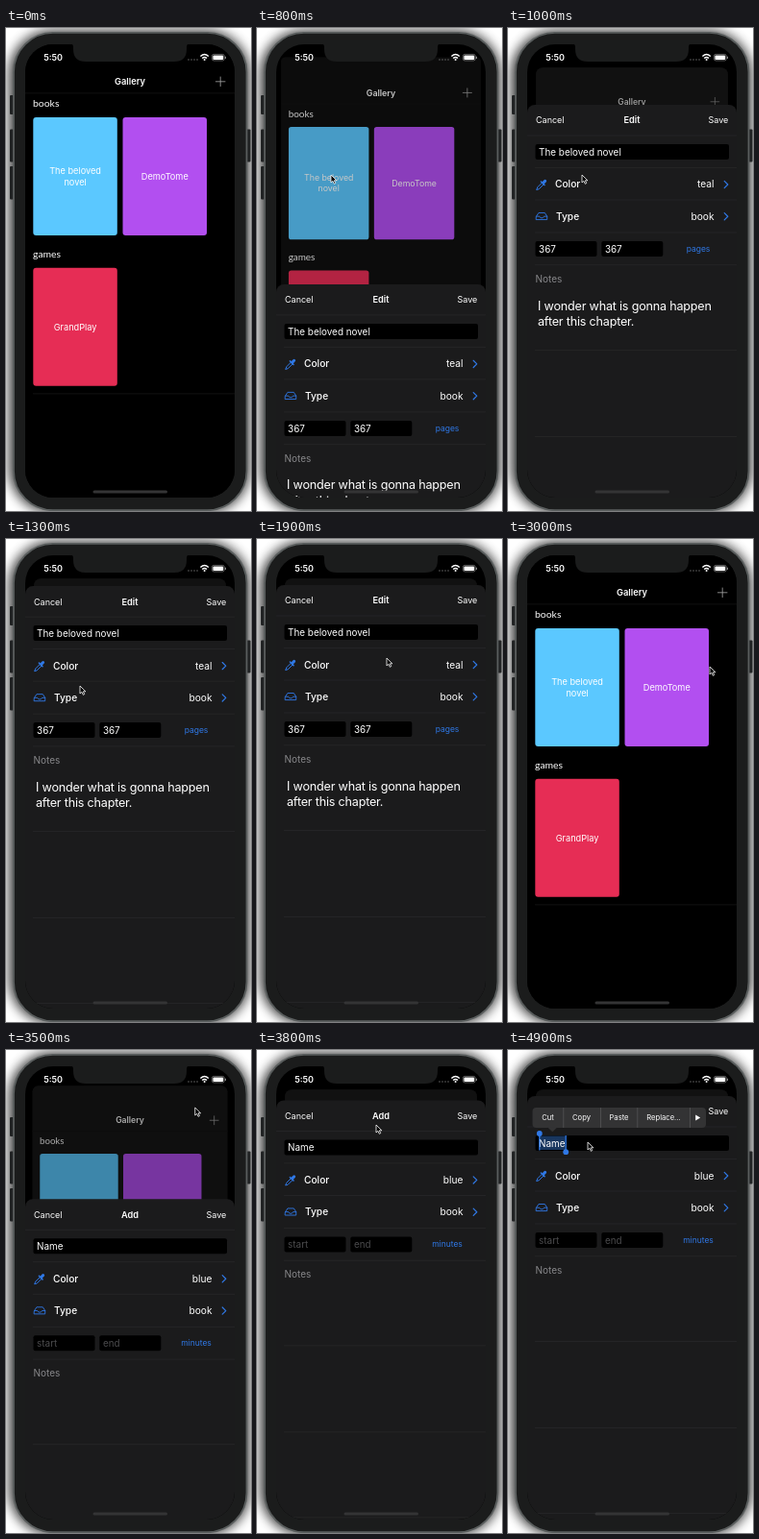
An HTML page that plays this animation: 255 by 503 pixels, repeating every 5000 ms.

```html
<!DOCTYPE html>
<html lang="en">
<head>
<meta charset="utf-8">
<title>Gallery app</title>
<style>
html, body { margin: 0; width: 100%; height: 100%; overflow: hidden; background: #fff; }
svg { display: block; width: 100vw; height: 100vh; }
text { font-family: Inter, "Liberation Sans", sans-serif; fill: #fff; }
.head { font-family: Lato, Inter, sans-serif; }
.icon { fill: none; stroke: #2f78e6; stroke-linecap: round; stroke-linejoin: round; }
</style>
</head>
<body>
<svg id="stage" viewBox="0 0 255 503" preserveAspectRatio="none"></svg>
<script>
const LOOP = 5000, STEP = 100;
const REST = 48, TRAVEL = 441;
const BLUE = '#2f78e6', SHEET = '#1b1b1c';

const rect = (x, y, w, h, fill, r = 0, extra = '') =>
  `<rect x="${x}" y="${y}" width="${w}" height="${h}" rx="${r}" fill="${fill}" ${extra}/>`;

function text(str, x, y, size, o = {}) {
  const { fill = '#fff', weight = 400, anchor = 'start', spacing = 0, cls = '' } = o;
  return `<text x="${x}" y="${y}" font-size="${size}" font-weight="${weight}" text-anchor="${anchor}"
    letter-spacing="${spacing}" class="${cls}" style="fill:${fill}">${str}</text>`;
}

const mid = { anchor: 'middle' };
const rule = (x, y, color = '#272728') => rect(x, y, 238 - x, 0.8, color);

function card(id, x, y, color, lines) {
  const top = y + 65 - (lines.length - 1) * 5.7;
  return `<g id="${id}">${rect(x, y, 87.5, 123, color, 3)}` +
    lines.map((s, i) => text(s, x + 43.8, top + i * 11.2, 9.2, mid)).join('') + '</g>';
}

function gallery() {
  return `<rect id="back" x="20" y="17" width="218" height="472"/>` +
    text('Gallery', 129, 59.2, 9.3, { anchor: 'middle', weight: 600 }) +
    '<path d="M218 55.8h10.4M223.2 50.6v10.4" stroke="#a8a8a8" stroke-width=".8"/>' +
    rule(20, 67.5, '#141414') +
    text('books', 28, 82.3, 10.4, { cls: 'head' }) +
    text('games', 28, 239, 10.4, { cls: 'head' }) +
    rule(28, 380.5, '#161616') +
    card('other', 121.5, 93, '#b24ff0', ['DemoTome']) +
    card('game', 28.3, 249.7, '#e62d55', ['GrandPlay']) +
    card('picked', 28.3, 93, '#5bc8ff', ['The beloved', 'novel']) +
    '<rect id="dim" x="20" y="17" width="218" height="472" fill="#000"/>';
}

const dropper = `<g class="icon"><path d="M29.8 136.2l1-2.4 4.6-4.6 1.7 1.7-4.6 4.6z" stroke-width="1"/>
  <path d="M34.4 128l3.6 3.6" stroke-width="1.5"/><path d="M36.8 129.2l1.8-1.8" stroke-width="3"/></g>`;
const tray = `<path class="icon" stroke-width=".9" d="M29.5 164.2l2.4-3.7h6.4l2.4 3.7v3.4h-11.2zh3.2
  q.6 1.7 2.4 1.7t2.4-1.7h3.2"/>`;

function row(y, icon, label, x, value) {
  return icon + text(label, x, y + 3.5, 10.2, { weight: 500 }) +
    text(value, 214.5, y + 3.5, 10.2, { anchor: 'end' }) +
    `<path class="icon" stroke-width="1.2" d="M225.2 ${y - 3.6}l3.6 3.6-3.6 3.6"/>`;
}

function sheet(id, o) {
  const faint = o.hint ? '#4b4b4d' : '#fff';
  const field = (x, y, w, s, fill) =>
    rect(x, y, w, 16, '#000', 2) + text(s, x + 3.6, y + 11.8, 9.9, { fill });
  return `<g id="${id}">${rect(20, REST, 218, 500, SHEET, 8)}` +
    text('Cancel', 29, 67.4, 9) +
    text(o.title, 129, 67.4, 9.2, { anchor: 'middle', weight: 600 }) +
    text('Save', 229.3, 67.4, 9, { anchor: 'end' }) +
    rule(20, 79.6) +
    [113, 146.6, 180.6, 214.4, 303, 393, 482].map(y => rule(28, y)).join('') +
    field(28.5, 89, 201.5, o.name, '#fff') +
    row(131, dropper, 'Color', 49, o.color) +
    row(164.3, tray, 'Type', 50, 'book') +
    field(28.5, 190, 64, o.from, faint) + field(97.3, 190, 64, o.to, faint) +
    text(o.unit, 198, 201, 8.5, { fill: BLUE, anchor: 'middle' }) +
    text('Notes', 28.5, 233, 10, { fill: '#87878a' }) +
    o.notes.map((s, i) => text(s, 31, 261.6 + i * 16.2, 12.6, { spacing: -0.2 })).join('') + '</g>';
}

function selection() {
  const grip = (x, dot) => rect(x - 0.6, 89, 1.2, 15.5, BLUE) +
    `<circle cx="${x}" cy="${dot}" r="2.9" fill="${BLUE}"/>`;
  return '<g id="select">' + rect(32, 89.5, 28.5, 14.5, '#18365f') +
    text('Name', 32.1, 100.8, 9.9) + grip(32.8, 87) + grip(60.2, 106.2) + '</g>';
}

function menu() {
  const items = [['Cut', 41.5], ['Copy', 76.5], ['Paste', 115.5], ['Replace...', 162]];
  return '<g id="menu">' + rect(25.5, 60, 180.5, 21, '#333334', 4) +
    '<path d="M41.5 80.8h9.5l-4.7 4.4z" fill="#333334"/>' +
    [57.5, 96, 134.5, 189.3].map(x => rect(x, 60, 0.7, 21, '#59595b')).join('') +
    items.map(([s, x]) => text(s, x, 73.3, 7.6, mid)).join('') +
    '<path d="M195.2 67.6v6l5-3z" fill="#fff"/></g>';
}

function body() {
  const button = (x, y, h) => rect(x, y, 4, h, '#202223', 1);
  return rect(3, 2, 251, 503, '#000', 46, 'opacity=".75" filter="url(#soft)"') +
    button(4, 70, 20) + button(4, 105.5, 34) + button(4, 144, 34.5) + button(250.5, 105.5, 34) +
    rect(8, 4.8, 242.5, 497.4, '#1b1c1c', 41, 'stroke="#5a5e5e" stroke-width="1.8"') +
    rect(20, 17, 218, 472, '#000', 29);
}

function status() {
  return '<path d="M66 16h126q-4 0-4 4v2q0 13-13 13H83q-13 0-13-13v-2q0-4-4-4z" fill="#1b1c1c"/>' +
    text('5:50', 39.2, 34, 9, { weight: 600 }) +
    [190, 193, 196, 199].map(x => `<circle cx="${x}" cy="33" r=".75" fill="#6a6a6a"/>`).join('') +
    `<g fill="none" stroke="#fff" stroke-width="1.4"><path d="M202.4 29.5q4.2-3.8 8.4 0"/>
     <path d="M204.2 31.5q2.4-2.2 4.8 0"/></g><circle cx="206.6" cy="33.1" r="1" fill="#fff"/>` +
    rect(214.4, 27.4, 12.8, 6.5, 'none', 1.8, 'stroke="#8c8c8c" stroke-width=".7"') +
    rect(215.4, 28.4, 10.8, 4.5, '#fff', 1) + rect(228, 29.5, 1, 2.4, '#8c8c8c', 0.5) +
    rect(90.5, 481.5, 77.5, 3, '#343435', 1.5);
}

const stage = document.getElementById('stage');
stage.innerHTML = `<defs>
  <clipPath id="screen">${rect(20, 17, 218, 472, '#000', 29)}</clipPath>
  <filter id="soft" x="-20%" y="-20%" width="140%" height="140%"><feGaussianBlur stdDeviation="6"/></filter>
  </defs>` + body() +
  `<g clip-path="url(#screen)"><g id="gallery">${gallery()}</g>` +
  sheet('edit', { title: 'Edit', name: 'The beloved novel', color: 'teal', from: '367', to: '367',
    unit: 'pages', notes: ['I wonder what is gonna happen', 'after this chapter.'] }) +
  sheet('add', { title: 'Add', name: 'Name', color: 'blue', from: 'start', to: 'end',
    unit: 'minutes', notes: [], hint: true }) +
  selection() + menu() + '</g>' + status() +
  `<path id="cursor" d="M0 0v8l1.9-1.7 1.4 3 1.4-.7-1.4-2.8h2.6z" fill="#000" stroke="#fff" stroke-width=".8"/>`;

const $ = id => document.getElementById(id);
const set = (id, name, value) => $(id).setAttribute(name, value);
const clamp = v => Math.max(0, Math.min(1, v));

// Linear interpolation through [time, ...values] keys.
function track(keys, t) {
  if (t <= keys[0][0]) return keys[0].slice(1);
  for (let i = 1; i < keys.length; i++) {
    const a = keys[i - 1], b = keys[i];
    if (t <= b[0]) {
      const k = (t - a[0]) / (b[0] - a[0]);
      return a.slice(1).map((v, j) => v + (b[j + 1] - v) * k);
    }
  }
  return keys[keys.length - 1].slice(1);
}

const pointer = [
  [100, 179, 306], [250, 130, 228], [450, 77, 153], [1700, 77, 153], [1900, 135, 124],
  [2200, 181, 127], [2300, 181, 127], [2400, 181, 187], [2500, 181, 303], [2600, 185, 375],
  [2800, 199, 235], [3000, 210, 133], [3200, 221, 54], [3400, 221, 54], [3800, 124, 78],
  [4100, 84, 97], [4200, 83, 96]
];
const pull = [[2300, 0], [2400, 60], [2500, 176], [2600, 300], [2700, 395], [2900, TRAVEL]];

// Critically damped spring from the bottom edge to rest.
function rise(start, t) {
  const x = Math.max(0, t - start) * 0.013;
  return TRAVEL * (1 + x) * Math.exp(-x);
}

function place(id, offset) {
  set(id, 'visibility', offset < TRAVEL ? 'visible' : 'hidden');
  set(id, 'transform', `translate(0 ${offset.toFixed(2)})`);
}

function draw(t) {
  const edit = t < 2300 ? rise(670, t) : track(pull, t)[0];
  const add = rise(3290, t);
  place('edit', edit);
  place('add', add);

  const p = clamp((1 - Math.min(edit, add) / TRAVEL) * 1.1);
  const s = 1 - 0.083 * p;
  const tone = Math.round(28 * p);
  set('gallery', 'transform', `translate(${129 * (1 - s)} ${25.6 * p}) scale(${s})`);
  set('back', 'fill', `rgb(${tone},${tone},${tone})`);
  set('back', 'rx', 8 * p);
  set('dim', 'rx', 8 * p);
  set('dim', 'opacity', 0.4 * p);

  const lift = track([[300, 1], [500, 1.15], [600, 1.1], [800, 1]], t)[0];
  set('picked', 'transform', `translate(72 154.5) scale(${lift}) translate(-72 -154.5)`);

  const [x, y] = track(pointer, t);
  set('cursor', 'visibility', t < 100 ? 'hidden' : 'visible');
  set('cursor', 'transform', `translate(${x} ${y})`);

  set('select', 'visibility', t >= 4600 ? 'visible' : 'hidden');
  set('menu', 'opacity', clamp((t - 4500) / 300));
}

function tick(now) {
  draw(Math.floor((now % LOOP) / STEP) * STEP);
  requestAnimationFrame(tick);
}
draw(0);
requestAnimationFrame(tick);
</script>
</body>
</html>
```
